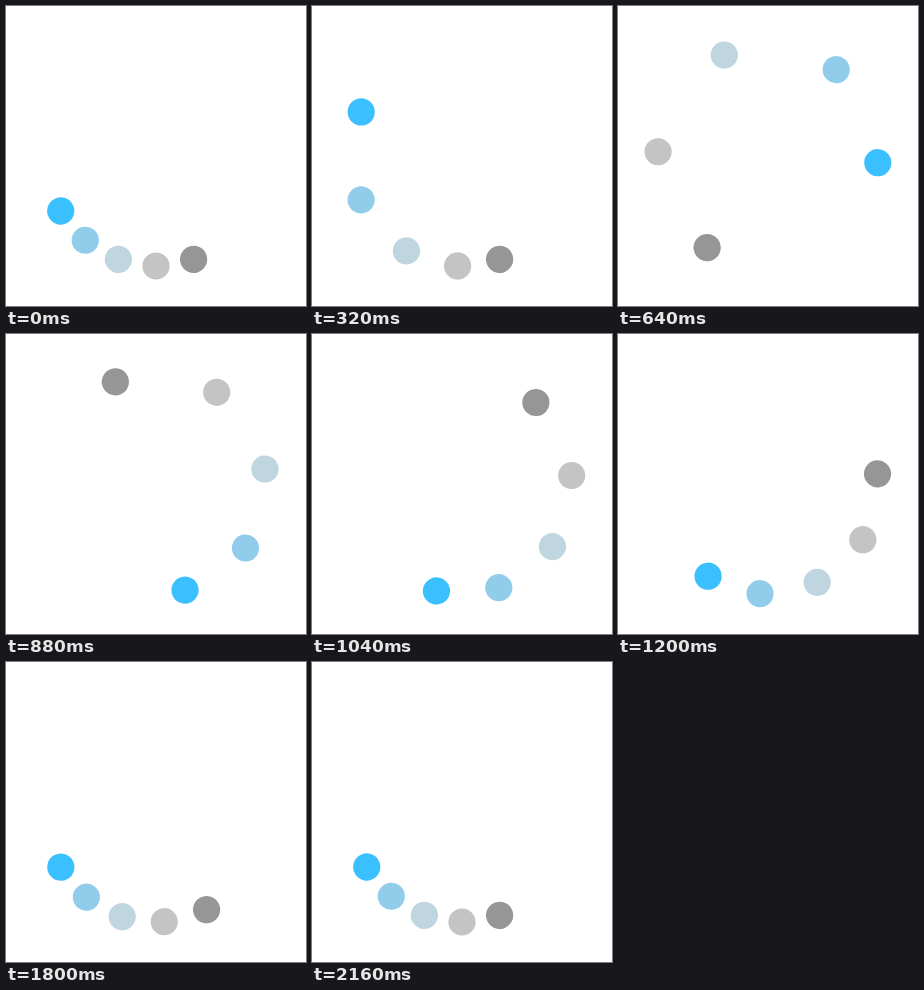
Recreate the animation shown at these times as an HTML page. Size 300 px wide and 300 px high, loop 2.32 s.

```html
<!DOCTYPE html>
<html lang="en">
<head>
<meta charset="utf-8">
<title>Loading dots</title>
<style>
  html, body { margin: 0; width: 100%; height: 100%; overflow: hidden; background: #fff; }
  svg { display: block; width: 100%; height: 100%; }
</style>
</head>
<body>
<svg id="stage" viewBox="0 0 300 300"></svg>
<script>
  const LOOP = 2320, STEP = 40, TURN = 1840, LAG = 80;
  const COLORS = ['#3ac0ff', '#91cdeb', '#bfd5e0', '#c4c4c4', '#969696'];
  const stage = document.getElementById('stage');

  const dots = COLORS.map(fill => {
    const dot = document.createElementNS('http://www.w3.org/2000/svg', 'circle');
    const attrs = { cx: 260, cy: 150, r: 13.6, fill };
    for (const name in attrs) dot.setAttribute(name, attrs[name]);
    return stage.appendChild(dot);
  });

  // cubic-bezier(.333, 0, .15, 1), solved by bisection
  function ease(x) {
    if (x <= 0) return 0;
    if (x >= 1) return 1;
    let lo = 0, hi = 1;
    for (let i = 0; i < 30; i++) {
      const s = (lo + hi) / 2, q = 1 - s;
      if (q * q * s + 0.45 * q * s * s + s * s * s < x) lo = s;
      else hi = s;
    }
    return lo * lo * (3 - 2 * lo);
  }

  // The motion advances in 25 poses per second; each dot trails the one before it.
  function draw(now) {
    const t = Math.floor((now % LOOP) / STEP) * STEP;
    dots.forEach((dot, i) => {
      const angle = 150 - 20 * i + 360 * ease((t - LAG * i) / TURN);
      dot.setAttribute('transform', `rotate(${angle} 150 150)`);
    });
  }

  function tick(now) {
    draw(now);
    requestAnimationFrame(tick);
  }

  draw(0);
  requestAnimationFrame(tick);
</script>
</body>
</html>
```
